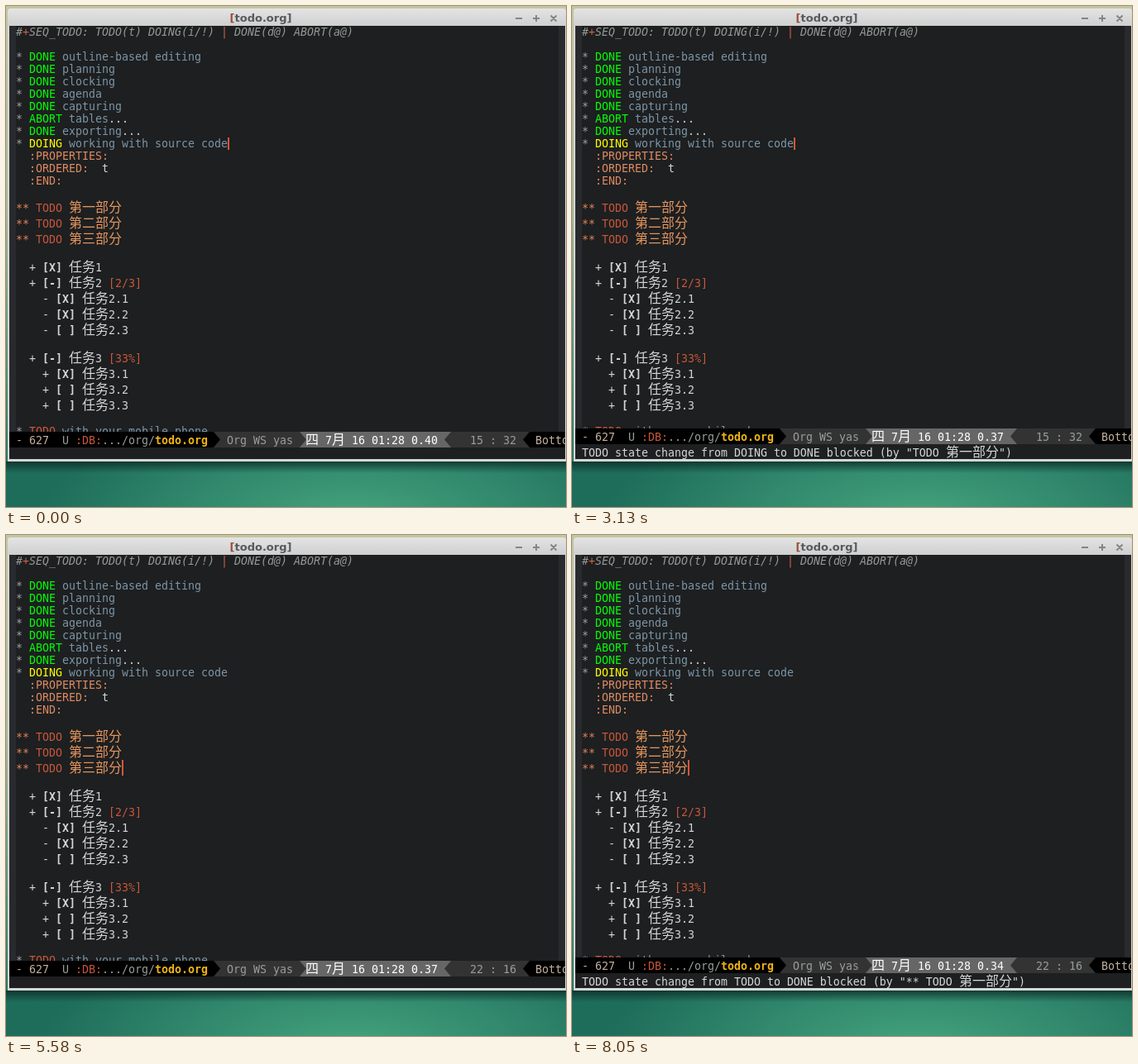
An HTML page that plays this animation: 677 by 606 pixels, repeating every 9.8 s.

```html
<!DOCTYPE html>
<html lang="en">
<head>
<meta charset="utf-8">
<title>todo.org</title>
<style>
  html, body { margin: 0; width: 677px; height: 606px; overflow: hidden; background: #1e6c5a; }
  svg { display: block; }
  text { white-space: pre; font: 13.29px "DejaVu Sans Mono", monospace; fill: #d4d6d6; }
  text.cjk { font: 16px "Noto Sans CJK SC", "Noto Sans CJK JP", "Noto Sans CJK", sans-serif; }
  .meta { font-style: italic; fill: #969896; }
  .metaRed { font-style: italic; fill: #d2603f; }
  .star { fill: #a0a2a2; }
  .h1 { fill: #7d95a5; }
  .h2 { fill: #e6965c; }
  .star2 { fill: #e8855a; }
  .todo { fill: #c9573a; }
  .done { fill: #00ff00; }
  .doing { fill: #ffff00; }
  .prop { fill: #de8a60; }
  .box { font-weight: bold; }
  .paren { fill: #1d1f21; }
  .tan { fill: #c4b09c; }
  .dim { fill: #9a9c9c; }
  .white { fill: #fff; }
  .file { font-weight: bold; fill: #f0b414; }
  #title { font: bold 13px "DejaVu Sans", sans-serif; text-anchor: middle; fill: #565a5c; }
  #title tspan { fill: #9a4a38; }
  #keys { font: bold 39.3px "DejaVu Sans", sans-serif; text-anchor: middle; fill: #c9dadc; }
</style>
</head>
<body>
<svg width="677" height="606" viewBox="0 0 677 606">
  <defs>
    <linearGradient id="wall" x2="0" y2="1">
      <stop offset="0" stop-color="#c2c79f"/>
      <stop offset=".4" stop-color="#a9b98f"/>
      <stop offset=".9" stop-color="#2b7862"/>
    </linearGradient>
    <radialGradient id="glow" gradientUnits="userSpaceOnUse" cx="0" cy="0" r="1"
        gradientTransform="translate(420 615) scale(380 130)">
      <stop offset="0" stop-color="#43a27c"/>
      <stop offset=".5" stop-color="#32896d"/>
      <stop offset="1" stop-color="#1e6c5a"/>
    </radialGradient>
    <linearGradient id="shade" x2="0" y2="1">
      <stop offset="0" stop-color="#0a2a24" stop-opacity=".8"/>
      <stop offset="1" stop-color="#0a2a24" stop-opacity="0"/>
    </linearGradient>
    <linearGradient id="bar" x2="0" y2="1">
      <stop offset="0" stop-color="#e4e4e4"/>
      <stop offset="1" stop-color="#cfcfcf"/>
    </linearGradient>
    <clipPath id="inside"><rect x="4" y="24" width="672" height="524"/></clipPath>
    <clipPath id="page"><rect id="pageBox" x="4" y="24" width="672" height="491"/></clipPath>
    <clipPath id="popup"><rect id="popupBox" x="-335.5" y="553" width="1366" height="60"/></clipPath>
  </defs>

  <rect width="677" height="606" fill="url(#wall)"/>
  <rect y="550" width="677" height="56" fill="url(#glow)"/>
  <rect y="551" width="677" height="14" fill="url(#shade)"/>

  <path d="M2 551V7q0-4 4-4H673q4 0 4 4V551Z" fill="#d6d6d6"/>
  <path d="M2 24V7q0-4 4-4H673q4 0 4 4V24Z" fill="url(#bar)"/>
  <path d="M616 15h8M637 15h8M641 11v8M658.500 11.500l7 7M665.500 11.500l-7 7" stroke="#858585" stroke-width="2" fill="none"/>
  <text id="title" x="308" y="19"></text>

  <g clip-path="url(#inside)">
    <rect x="4" y="24" width="672" height="524" fill="#1d1f21"/>
    <path d="M4 24h8v500h-8zM668 24h8v500h-8z" fill="#282a2e"/>
    <g id="doc" clip-path="url(#page)"></g>
    <g id="panes"></g>
  </g>

  <g id="overlay" style="display: none">
    <g clip-path="url(#popup)">
      <path d="M0 553H677V606H0Z" fill="#03041a"/>
      <path d="M0 558Q340 554 677 566V606H0Z" fill="#182615"/>
      <path d="M105 606Q150 558 300 558L610 564Q590 590 640 606Z" fill="#182430"/>
      <path d="M105 606Q150 562 290 559L480 561Q500 590 560 606Z" fill="#0b2823"/>
      <path d="M240 606Q270 563 350 562L475 565Q480 590 530 606Z" fill="#12352a"/>
    </g>
    <text id="keys" x="347.5" y="597.5"></text>
  </g>
</svg>

<script>
(() => {
const LOOP = 9800, CELL = 8, LEFT = 12, FIRST_ROW = 6, POPUP_MS = 175;
const $ = id => document.getElementById(id);
const CJK = /[\u4e00-\u9fff]/;

const cells = s => [...s].reduce((n, c) => n + (CJK.test(c) ? 2 : 1), 0);
const textOf = runs => runs.filter((_, i) => i % 2).join('');

// One text element per stretch of equal script, placed on the character grid.
function put(x, y, cls, str) {
  let out = '';
  for (const piece of str.match(/[\u4e00-\u9fff]+|[^\u4e00-\u9fff]+/g) || []) {
    const kind = CJK.test(piece) ? cls + ' cjk' : cls;
    if (piece.trim()) out += `<text x="${x}" y="${y}" class="${kind}">${piece}</text>`;
    x += cells(piece) * CELL;
  }
  return out;
}

// Runs alternate class and string.
function putRuns(x, y, runs) {
  let out = '';
  for (let i = 0; i < runs.length; i += 2) {
    out += put(x, y, runs[i], runs[i + 1]);
    x += cells(runs[i + 1]) * CELL;
  }
  return out;
}

const head = (cls, word, title, more = '') =>
  ['star', '* ', cls, word, 'h1', ' ' + title, 'fg', more];
const part = name => ['star2', '** ', 'todo', 'TODO', 'h2', ' ' + name];
const item = (lead, mark, name, count = '') =>
  ['fg', lead + ' ', 'box', `[${mark}]`, 'fg', ' ' + name, 'todo', count];

const lines = [
  ['meta', '#', 'metaRed', '+', 'meta', 'SEQ_TODO: TODO(t) DOING(i/!) ', 'metaRed', '|',
    'meta', ' DONE(d@) ABORT(a@)'],
  [],
  head('done', 'DONE', 'outline-based editing'),
  head('done', 'DONE', 'planning'),
  head('done', 'DONE', 'clocking'),
  head('done', 'DONE', 'agenda'),
  head('done', 'DONE', 'capturing'),
  head('done', 'ABORT', 'tables', '...'),
  head('done', 'DONE', 'exporting', '...'),
  head('doing', 'DOING', 'working with source code'),
  ['prop', '  :PROPERTIES:'],
  ['prop', '  :ORDERED:', 'fg', '  t'],
  ['prop', '  :END:'],
  [],
  part('第一部分'), part('第二部分'), part('第三部分'),
  [],
  item('  +', 'X', '任务1'),
  item('  +', '-', '任务2', ' [2/3]'),
  item('    -', 'X', '任务2.1'),
  item('    -', 'X', '任务2.2'),
  item('    -', ' ', '任务2.3'),
  [],
  item('  +', '-', '任务3', ' [33%]'),
  item('    +', 'X', '任务3.1'),
  item('    +', ' ', '任务3.2'),
  item('    +', ' ', '任务3.3'),
  [],
  head('todo', 'TODO', 'with your mobile phone'),
];

let lineTop = 24;
const layout = lines.map(runs => {
  const str = textOf(runs), tall = CJK.test(str);
  const box = { y: lineTop, h: tall ? 19 : 15, base: lineTop + (tall ? 15 : 12), end: cells(str) };
  lineTop += box.h;
  return box;
});
const docText = lines.map((runs, i) => putRuns(LEFT, layout[i].base, runs)).join('');

const ACTIVE = ['#000', '#333', '#666'], IDLE = ['#4b5050', '#1c1d1d', '#242525'];

// Status bar; a, b, c, d are the four arrow separators.
function statusBar(y, [a, b, c, d], colors, o) {
  const right = (x, f) => `<path d="M4 ${y}H${x}l8 9.500l-8 9.500H4Z" fill="${f}"/>`;
  const left = (x, f) => `<path d="M676 ${y}H${x + 8}l-8 9.500l8 9.500H676Z" fill="${f}"/>`;
  const base = y + 15, [edge, mid, core] = colors;
  return `<rect x="4" y="${y}" width="672" height="19" fill="${core}"/>` +
    right(b, mid) + right(a, edge) + left(c, mid) + left(d, edge) +
    putRuns(LEFT, base, o.name) +
    put(a + 16, base, 'dim', o.mode) +
    put(c - 168, base, 'white', '四 7月 16 01:28 ' + o.load) +
    put(d - 64, base, 'dim', `${String(o.row).padStart(2)} : ${String(o.col).padStart(2)}`) +
    put(d + 15, base, o.whereCls, o.where);
}

const docBar = (y, s) => statusBar(y, [251, 355, 530, 625], s.menu ? IDLE : ACTIVE, {
  name: ['tan', '- 627  ', 'dim', 'U ', 'todo', ':DB:', 'dim', '.../org/', 'file', 'todo.org'],
  mode: 'Org WS yas', load: s.load, row: s.row, col: s.col,
  where: s.menu ? ' 4%' : 'Bottom', whereCls: s.menu ? 'h1' : 'tan',
});

function menuPane(s) {
  const paren = x => `<rect x="${x}" y="474" width="8" height="15" fill="#81a2be"/>`;
  return paren(LEFT) + paren(LEFT + 50 * CELL) +
    putRuns(LEFT, 486, ['paren', '{', 'fg', ' [t] ', 'todo', 'TODO', 'fg', '    [i] ', 'doing', 'DOING',
      'fg', '   [d] ', 'done', 'DONE', 'fg', '    [a] ', 'done', 'ABORT', 'fg', '   ', 'paren', '}']) +
    docBar(455, s) +
    statusBar(515, [171, 307, 510, 605], ACTIVE, {
      name: ['tan', '* 53  ', 'dim', 'U  ', 'file', '*Org todo*'],
      mode: 'Fundamental WS', load: s.load, row: 1, col: 0, where: 'All', whereCls: 'tan',
    }) +
    '<rect x="4" y="534" width="672" height="14" fill="#1d1f21"/>' +
    put(LEFT, 546, 'fg', '[a-z..]:Set [SPC]:clear');
}

function drawEditor(s) {
  const line = layout[s.row - FIRST_ROW];
  const barTop = s.menu ? 455 : s.echo ? 511 : 515;
  $('title').innerHTML = '<tspan>[</tspan>' + (s.menu ? ' *Org todo*]' : 'todo.org]');
  $('pageBox').setAttribute('height', barTop - 24);
  $('doc').innerHTML = docText +
    `<rect x="${LEFT + s.col * CELL}" y="${line.y}" width="2" height="${line.h}" fill="#d0583c"/>`;
  $('panes').innerHTML = s.menu ? menuPane(s) :
    `<rect x="4" y="${barTop}" width="672" height="40" fill="#1d1f21"/>` +
    docBar(barTop, s) + (s.echo ? put(LEFT, 545, 'fg', s.echo) : '');
}

const at = (row, load, more) =>
  ({ row, load, col: Math.min(32, layout[row - FIRST_ROW].end), ...more });
const blocked = (from, by) => ({ echo: `TODO state change from ${from} to DONE blocked (by "${by}")` });
const moves = [3760, 3900, 4010, 4150, 4270, 4390, 4590];

const editor = [
  [0, at(15, '0.40')],
  [1370, at(15, '0.37', { menu: true, col: 1 })],
  [2130, at(15, '0.37', blocked('DOING', 'TODO 第一部分'))],
  ...moves.map((t, i) => [t, at(16 + i, '0.37')]),
  [5830, at(22, '0.34')],
  [6460, at(22, '0.34', { menu: true, col: 2 })],
  [7050, at(22, '0.34', blocked('TODO', '** TODO 第一部分'))],
];

const setState = t => [[t, 'Ctrl+c'], [t + 280, 'Ctrl+c Ctrl+t']];
const typing = [
  [0, ''],
  ...setState(1040), [2180, 'Ctrl+c Ctrl+t d'], [3130, ''],
  ...moves.map((t, i) => [i ? t + 40 : 3720, Array(i + 1).fill('Ctrl+n').join(' ')]), [5580, ''],
  ...setState(6130), [7100, 'Ctrl+c Ctrl+t d'], [8050, ''],
];
const opens = [1040, 3720, 6130];

const current = (list, t) => list.filter(e => e[0] <= t).pop()[1];

let shown, shownKeys;
function draw(now) {
  const t = now % LOOP;
  const state = current(editor, t), typed = current(typing, t);
  if (state !== shown) drawEditor(shown = state);
  if (typed !== shownKeys) {
    $('keys').textContent = shownKeys = typed;
    $('overlay').style.display = typed ? '' : 'none';
  }
  if (typed) {
    const age = Math.min(1, (t - opens.filter(o => o <= t).pop()) / POPUP_MS);
    const scale = Math.max(.001, 1 - (1 - age) ** 2);
    const zoom = `translate(347.5 583) scale(${scale}) translate(-347.5 -583)`;
    $('popupBox').setAttribute('transform', zoom);
    $('keys').setAttribute('transform', zoom);
  }
}

const begin = performance.now();
function tick() {
  draw(Math.max(0, performance.now() - begin));
  requestAnimationFrame(tick);
}
tick();
})();
</script>
</body>
</html>
```
